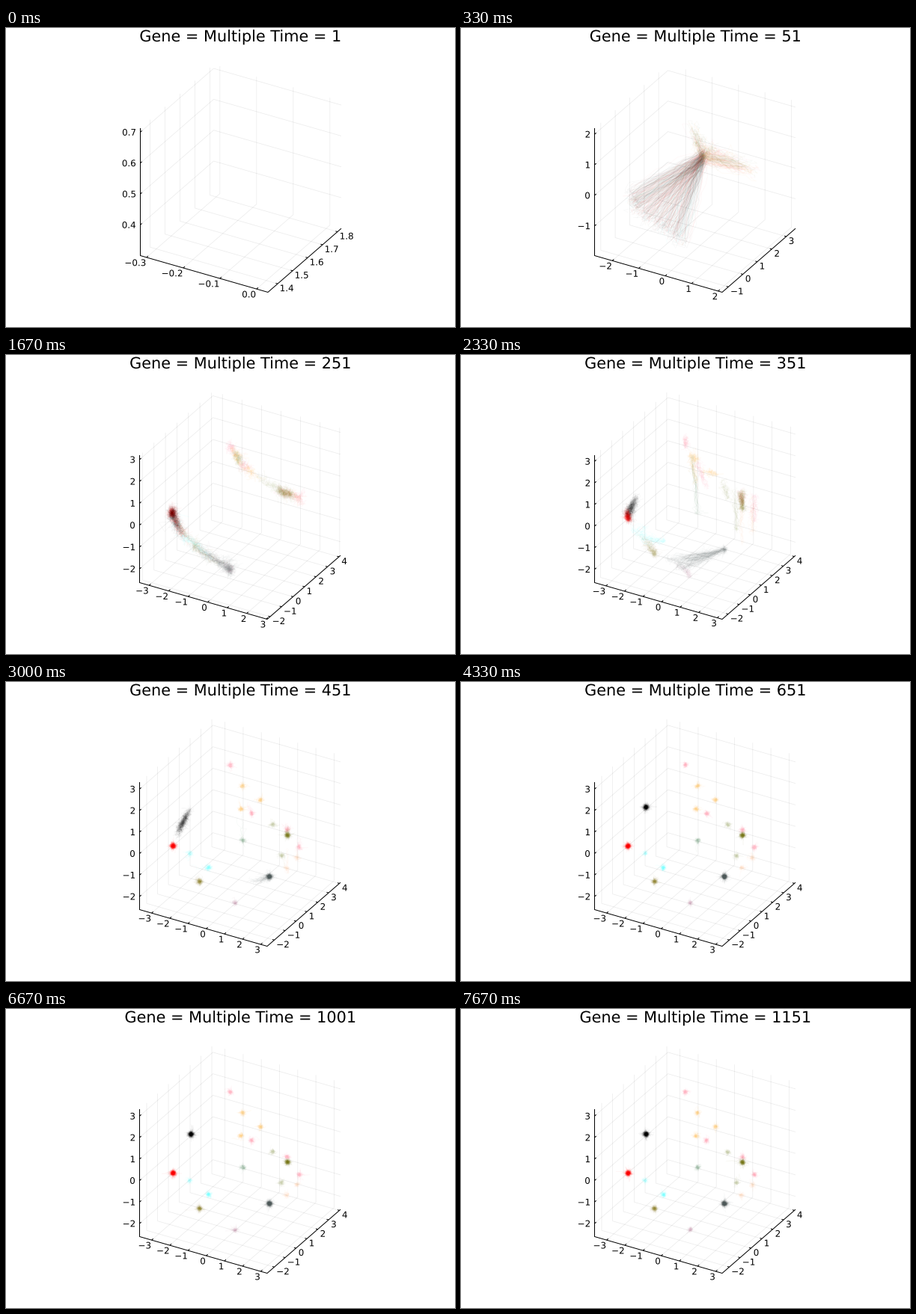
Recreate the animation shown at these times as a matplotlib script. Size 600x400 px, loop 8000 ms.

```python
import math

import matplotlib.pyplot as plt
import numpy as np
from matplotlib.animation import FuncAnimation
from matplotlib.collections import LineCollection
from matplotlib.colors import to_rgba
from matplotlib.patches import PathPatch
from matplotlib.textpath import TextPath
from matplotlib.transforms import Affine2D

WIDTH, HEIGHT, DPI = 600, 400, 100
LOOP_MS, TICK_MS, STATES = 8000, 50, 24
TIME_PER_STATE, STEP, TRAIL = 50, 5, 20
PX = 72 / DPI

# Projected edge vectors of the box, in pixels
EDGES = np.array([(170.5, 49), (98, -85.3), (0, -170.5)])

# Axis ranges grow with the logarithm of time: x, y, z as (low, high)
RANGE_TIMES = (1, 151, 251, 401)
RANGES = np.array([
    [(-0.317, 0.031), (1.335, 1.825), (0.3003, 0.713)],
    [(-3.32, 2.74), (-2.19, 4.14), (-2.60, 2.61)],
    [(-3.487, 3.046), (-2.256, 4.134), (-2.63, 3.20)],
    [(-3.663, 3.354), (-2.655, 4.10), (-2.61, 3.32)],
])

# Cells start together, spread along one of two curves, then settle at home
START = np.array((324, 172))
LEFT_CURVE = np.array([(222, 211), (232, 238), (262, 263), (300, 287)])
RIGHT_CURVE = np.array([(299, 121), (318, 150), (362, 180), (398, 193)])

# Colour, number of cells, gathering place on the left curve, home
LEFT = [
    ("black", 130, 0.0, (247.3, 167.5)),
    ("red", 130, 0.0, (223.2, 219.5)),
    ("#4c5858", 130, 0.9, (352, 260.3)),
    ("#807000", 50, 0.55, (258.7, 267)),
    ("cyan", 12, 0.35, (246, 229.3)),
    ("cyan", 24, 0.4, (270.5, 248.5)),
    ("#a04070", 15, 1.0, (306.5, 295.5)),
]
# Colour, number of cells per home, homes
RIGHT = [
    ("#6f6f00", 60, [(376.3, 205)]),
    ("#ff6080", 17, [(299.7, 111), (328, 176), (376, 198), (392, 221.5)]),
    ("orange", 16, [(316, 139), (340, 157.5), (314, 170)]),
    ("#80903c", 15, [(356.5, 190.8), (368.5, 232.3)]),
    ("#ffa860", 10, [(375, 249), (389, 235)]),
    ("#408050", 17, [(316.5, 212)]),
]

rng = np.random.default_rng(7)


def along(curve, place):
    """Points on a curve; place runs from 0 to 1."""
    place = np.clip(place, 0, 1) * (len(curve) - 1)
    knots = np.arange(len(curve))
    return np.stack([np.interp(place, knots, axis) for axis in curve.T], -1)


def simulate(count, curve, gather, scatter, home, arrival):
    """Noisy walks: start, anywhere on the curve, gathering place, home."""
    steps = np.arange(1, STATES * TIME_PER_STATE + 2, STEP)
    local = steps * rng.uniform(0.85, 1.1, (count, 1))
    spread = rng.uniform(-1, 1, count) * scatter
    stops = np.stack([
        np.tile(START, (count, 1)),
        along(curve, rng.uniform(0.1, 1, count)),
        along(curve, gather + spread),
        along(curve, gather + 0.25 * spread),
        np.tile(home, (count, 1)),
    ], 1)
    times = (1, 42, 145, 245, arrival)
    walk = np.array([[np.interp(local[i], times, stops[i, :, axis]) for axis in (0, 1)]
                     for i in range(count)]).transpose(0, 2, 1)

    noise = np.zeros_like(walk)
    for i in range(1, len(steps)):
        noise[:, i] = 0.6 * noise[:, i - 1] + 0.7 * rng.standard_t(5, (count, 2))
    early = np.exp(-(local / 230) ** 2)[..., None]
    offset = rng.normal(size=(count, 1, 2)) * (2.5, 5)
    return walk + noise * (1.7 + 1.1 * early) + offset * early


def build_cells():
    walks, colors = [], []
    for color, count, gather, home in LEFT:
        arrival = 500 if color == "black" else 340
        walks.append(simulate(count, LEFT_CURVE, gather, 0.45, home, arrival))
        colors += [to_rgba(color, 0.032)] * count
    low, high = RIGHT_CURVE[0, 0], RIGHT_CURVE[-1, 0]
    for color, count, homes in RIGHT:
        for home in homes:
            gather = (home[0] - low) / (high - low)
            walks.append(simulate(count, RIGHT_CURVE, gather, 0.12, home, 340))
            colors += [to_rgba(color, 0.04)] * count
    order = rng.permutation(len(colors))
    return np.concatenate(walks)[order], np.array(colors)[order]


cells, cell_colors = build_cells()

plt.rcParams["font.family"] = "DejaVu Sans"
fig = plt.figure(figsize=(WIDTH / DPI, HEIGHT / DPI), dpi=DPI, facecolor="white")
ax = fig.add_axes([0, 0, 1, 1])


def add_lines(lines, width, color, order):
    ax.add_collection(LineCollection(lines, linewidths=width * PX, colors=color, zorder=order))


def label(x, y, text, anchor, size=11.9):
    """Text with its baseline at y; anchor 0, 0.5, 1 is left, centre, right."""
    outline = TextPath((0, 0), text, size=size)
    box = outline.get_extents()
    place = Affine2D().translate(-box.x0 - anchor * box.width, 0).scale(1, -1).translate(x, y)
    ax.add_patch(PathPatch(outline.transformed(place), facecolor="black", linewidth=0))


def tick_values(low, high):
    step = 0.1 if high - low < 1 else 1
    for n in range(math.ceil(low / step), math.floor(high / step) + 1):
        text = f"{n / 10:.1f}" if step < 1 else str(n)
        yield (n * step - low) / (high - low), text.replace("-", "\u2212")


def draw_box(time):
    origin = np.array([179.5 if time == 1 else 178.5, 304.5])

    def project(*corner):
        return origin + np.array(corner) @ EDGES

    log_times = np.log(RANGE_TIMES)
    x_range, y_range, z_range = [
        [np.interp(math.log(time), log_times, RANGES[:, axis, end]) for end in (0, 1)]
        for axis in range(3)
    ]
    grid = []
    lines = [[project(0, 0, 1), project(0, 0, 0), project(1, 0, 0), project(1, 1, 0)]]
    for u, text in tick_values(*x_range):
        grid.append([project(u, 0, 0), project(u, 1, 0), project(u, 1, 1)])
        lines.append([project(u, 0, 0), project(u, 0.022, 0)])
        x, y = project(u, 0, 0)
        label(x - 1.5, y + 11.3, text, 1)
    for v, text in tick_values(*y_range):
        grid.append([project(0, v, 1), project(0, v, 0), project(1, v, 0)])
        lines.append([project(1, v, 0), project(0.985, v, 0)])
        x, y = project(1, v, 0)
        label(x + 4, y + 10, text, 0)
    for w, text in tick_values(*z_range):
        grid.append([project(0, 0, w), project(0, 1, w), project(1, 1, w)])
        lines.append([project(0, 0, w), project(0, 0.022, w)])
        x, y = project(0, 0, w)
        label(x - 6.5, y + 4.4, text, 1)
    add_lines(grid, 0.8, (0, 0, 0, 0.075), 1)
    add_lines(lines, 1, "black", 3)


def draw_state(state):
    ax.clear()
    ax.set_axis_off()
    ax.set_xlim(0, WIDTH)
    ax.set_ylim(HEIGHT, 0)
    time = 1 + TIME_PER_STATE * state
    draw_box(time)
    label(312.9, 18, f"Gene = Multiple Time = {time}", 0.5, 20.83)
    if state:
        end = state * TIME_PER_STATE // STEP
        add_lines(cells[:, max(0, end - TRAIL):end + 1], 0.7, cell_colors, 2)


shown = {"state": None}


def draw(frame):
    # The small lead keeps each change at or just before its due time
    state = int((frame * TICK_MS + 34) * STATES / LOOP_MS)
    if state != shown["state"]:
        draw_state(state)
        shown["state"] = state
    return []


animation = FuncAnimation(fig, draw, frames=LOOP_MS // TICK_MS, interval=TICK_MS,
                          init_func=lambda: [], repeat=True, repeat_delay=0)
plt.show()
```
